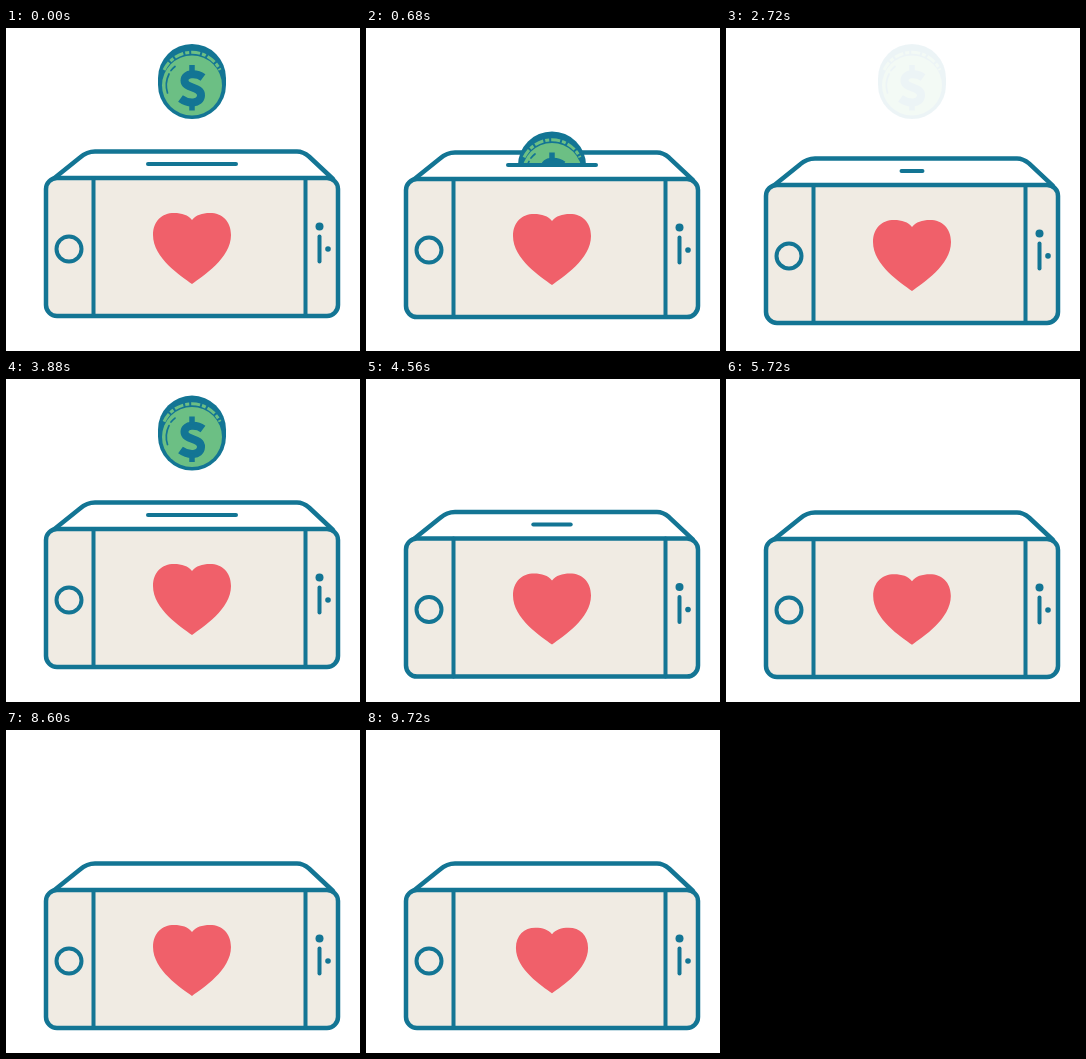
Write an HTML page that moves like this. It is 354 by 323 pixels and loops after 9760 ms.

```html
<!DOCTYPE html>
<html lang="en">
<head>
<meta charset="utf-8">
<title>Coin drop</title>
<style>
  html, body { margin: 0; width: 100%; height: 100%; overflow: hidden; background: #fff; }
  svg { display: block; width: 100%; height: 100%; }
  .line { fill: none; stroke: #137594; stroke-width: 4.5; stroke-linecap: round; stroke-linejoin: round; }
  .ink { fill: #137594; }
</style>
</head>
<body>
<svg viewBox="0 0 354 323">
  <clipPath id="aboveSlot"><rect id="opening" width="354" height="136"/></clipPath>

  <g id="phone">
    <path class="line" d="M46 152 L74 129.500 Q81 123.500 89 123.500 H291 Q297 123.500 303 128.500 L327 151"/>
    <rect class="line" x="40" y="150" width="292" height="138" rx="11" style="fill:#f0ebe3"/>
    <path class="line" style="stroke-width:4" d="M87.500 150 V288 M299.500 150 V288"/>
    <circle class="line" style="stroke-width:4" cx="63" cy="221" r="12.500"/>
    <circle class="ink" cx="313.500" cy="198.500" r="4"/>
    <path class="line" style="stroke-width:4" d="M313.500 208.500 V233.500"/>
    <circle class="ink" cx="322" cy="221" r="2.800"/>
    <path id="heart" fill="#f0606a" d="M186 256 C175 248 147 230 147 207 C147 193 156 185 168 185 C176 185 182 187 186 192 C190 187 196 185 204 185 C216 185 225 193 225 207 C225 230 197 248 186 256Z"/>
  </g>

  <g clip-path="url(#aboveSlot)">
    <g id="coin">
      <path class="ink" d="M152 50 A34 34 0 0 1 220 50 V57 A34 34 0 0 1 152 57Z"/>
      <path d="M158 42 A31 31 0 0 1 214 42" fill="none" stroke="#6cbf84" stroke-width="3" stroke-dasharray="9 2 4 2"/>
      <circle cx="186" cy="57.500" r="30" fill="#6cbf84"/>
      <path class="line" style="stroke-width:1.700" d="M161.500 65 A25.500 25.500 0 0 1 163 46 M165 42.500 A26 26 0 0 1 169 38.500"/>
      <path class="line" style="stroke-width:8;stroke-linecap:butt" d="M197 49.500 C191 45 178.500 44.500 178.500 52.500 C178.500 61 195.500 58 195 67.500 C194.500 76.500 182 76 174.500 70.500"/>
      <path class="line" style="stroke-width:5.500;stroke-linecap:butt" d="M186 37 V45 M186 74 V82.500"/>
    </g>
  </g>

  <path id="slot" class="line" style="stroke-width:4"/>
</svg>
<script>
const LOOP = 9760;
const STARTS = [160, 3840, 7680];
const BEAT = 500, FIRST_BEAT = 910, LAST_BEAT = 2410;
const get = id => document.getElementById(id);
const [phone, heart, coin, opening, slot] = ["phone", "heart", "coin", "opening", "slot"].map(get);

const progress = (t, from, to) => Math.min(1, Math.max(0, (t - from) / (to - from)));
const smooth = p => p * p * (3 - 2 * p);
const ramp = (t, from, to) => smooth(progress(t, from, to));

function draw(now) {
  const time = now % LOOP;
  const start = STARTS.filter(s => s <= time).pop() ?? time;
  const t = time - start;

  const dip = 10 * (ramp(t, 460, 760) - ramp(t, 2420, 2800));
  const beating = t > FIRST_BEAT && t < LAST_BEAT;
  const scale = beating
    ? 1 - 0.07 * (1 - Math.cos((t - FIRST_BEAT) / BEAT * 2 * Math.PI))
    : 1;
  const slotHalf = 44 * (1 - ramp(t, 600, 820) + ramp(t, 2450, 2800));
  const returning = t > 2400;
  const fall = returning ? 0 : 132 * progress(t, 0, 640) ** 2;

  phone.setAttribute("transform", `translate(0 ${dip})`);
  heart.setAttribute("transform", `translate(186 220.5) scale(${scale}) translate(-186 -220.5)`);
  opening.setAttribute("height", 136 + dip);
  coin.setAttribute("transform", `translate(0 ${fall})`);
  coin.setAttribute("opacity", returning ? ramp(t, 2480, 2960) : t < 640 ? 1 : 0);
  slot.setAttribute("d", slotHalf > 0.1 ? `M${186 - slotHalf} ${136 + dip} h${2 * slotHalf}` : "");
}

function tick() {
  draw(performance.now());
  requestAnimationFrame(tick);
}
tick();
</script>
</body>
</html>
```
